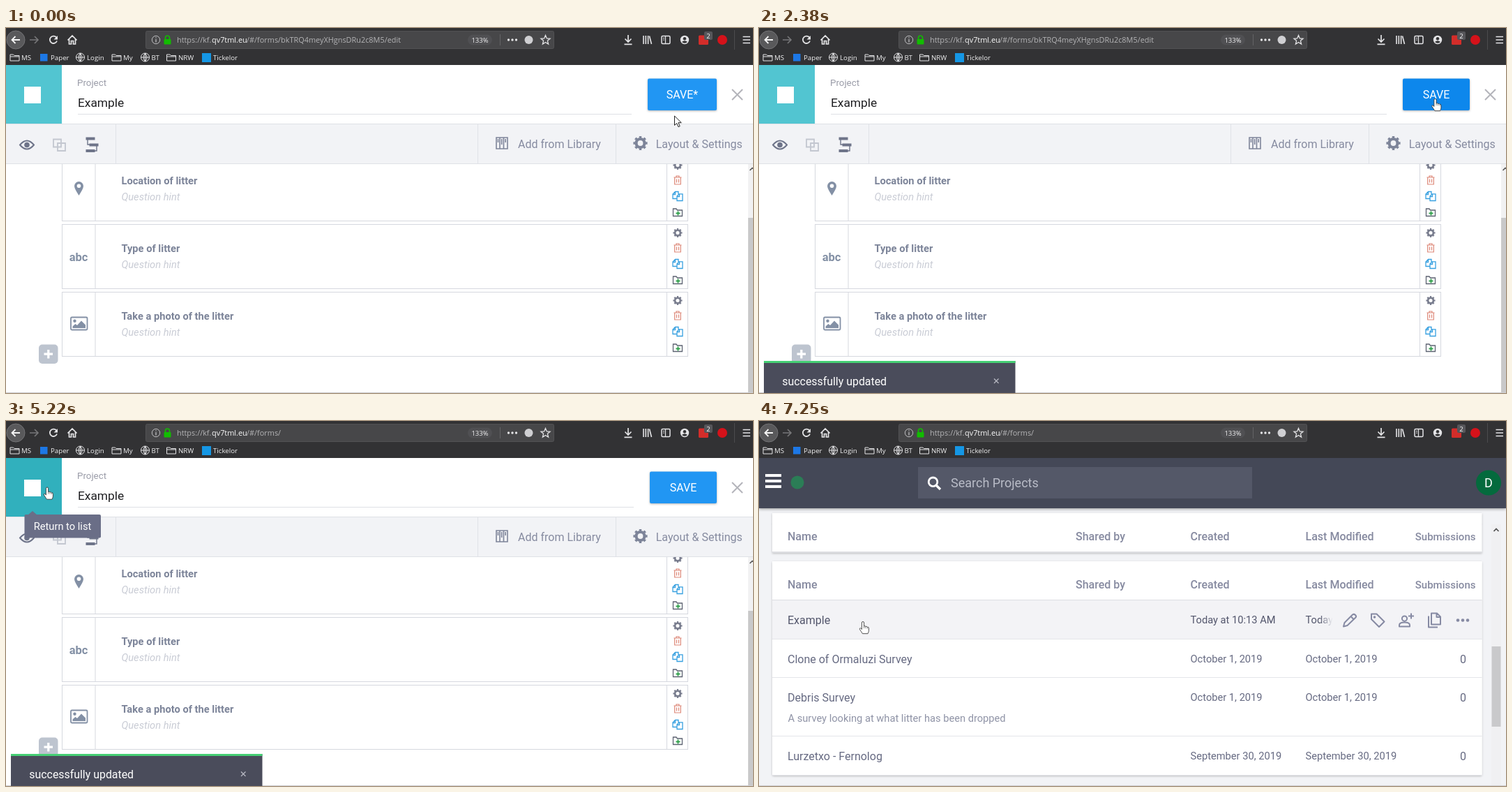
Animation, 1071 px wide and 523 px high, one loop 8000 ms. Source, as an HTML page:

```html
<!DOCTYPE html>
<html lang="en">
<head>
<meta charset="utf-8">
<title>Saving a form</title>
<style>
  html, body { margin: 0; width: 100%; height: 100%; overflow: hidden; background: #fff; }
  svg { display: block; width: 1071px; height: 523px; font-family: Roboto, sans-serif; }
  .ui { font-family: "Open Sans", sans-serif; }
  .row text { fill: #666a82; }
  .row .sub { fill: #8f93a6; }
  .row.on text { fill: #53566c; }
  .row.on .sub { fill: #83879b; }
  .row.on .bg { fill: #f3f3f6; }
  .card { filter: drop-shadow(0 1px 1.5px rgba(0, 0, 0, .22)); }
</style>
</head>
<body>
<svg id="stage" viewBox="0 0 1071 523"></svg>
<script>
const LOOP = 8000;
const stage = document.getElementById('stage');

// Markup helpers
const rect = (x, y, w, h, fill, more = '') =>
  `<rect x="${x}" y="${y}" width="${w}" height="${h}" fill="${fill}" ${more}/>`;
const text = (x, y, str, size, fill, more = '') =>
  `<text x="${x}" y="${y}" font-size="${size}" fill="${fill}" ${more}>${str}</text>`;
const line = (d, color, w = 1, more = '') =>
  `<path d="${d}" fill="none" stroke="${color}" stroke-width="${w}" ${more}/>`;
const shape = (d, fill, more = '') => `<path d="${d}" fill="${fill}" ${more}/>`;
const disc = (x, y, r, fill, more = '') =>
  `<circle cx="${x}" cy="${y}" r="${r}" fill="${fill}" ${more}/>`;
const ring = (x, y, r, color, w = 1, more = '') =>
  disc(x, y, r, 'none', `stroke="${color}" stroke-width="${w}" ${more}`);
const at = (x, y, body, more = '') => `<g transform="translate(${x} ${y})" ${more}>${body}</g>`;
const MID = ' text-anchor="middle"', END = ' text-anchor="end"';

const gear = (x, y, r, color) =>
  ring(x, y, r * .6, color, r * .42) +
  ring(x, y, r * .86, color, r * .3, 'pathLength="16" stroke-dasharray="1 1" stroke-dashoffset=".5"');

// Browser toolbar
function browserBar() {
  const c = '#e4e4e6', ui = 'class="ui"';
  const folder = x => at(x, 42, line('M-6.5-4H-2L-.5-2.5H6.5V5H-6.5ZM-6.5-1H6.5', c));
  const globe = x => at(x, 42, ring(0, 0, 6, c) + line('M-6 0H6M0-6V6M0-6Q-5 0 0 6Q5 0 0-6', c));
  const label = (x, s) => text(x, 46, s, 9.7, '#f2f2f3', ui);
  return rect(0, 0, 1071, 53, '#323234') +
    disc(14, 17, 13, '#59595b', 'stroke="#737376"') +
    line('M20 17H8.5M13.5 12L8.5 17L13.5 22', '#f5f5f5', 1.8) +
    line('M34 17H46M41 12L46 17L41 22', '#777779', 1.6) +
    line('M72.5 14A5.2 5.2 0 1 0 73 18.5', c, 1.8) + shape('M74 11V16.5H68.5Z', c) +
    line('M88.5 17.5L95 11L101.5 17.5M90.5 16V23H93.5V18.5H96.5V23H99.5V16', c, 1.7) +
    rect(200.5, 4.5, 585, 25, '#474749', 'rx="2" stroke="#525254"') +
    ring(215, 17, 5.7, '#bdbdbf') + line('M215 16V20.5M215 13.2V14.6', '#bdbdbf', 1.3) +
    rect(226.5, 16, 10, 7.5, '#12bc00', 'rx="1"') + line('M228.5 16V14A3 3 0 0 1 234.5 14V16', '#12bc00', 1.7) +
    text(245, 21, 'https://kf.', 10.9, '#b4b4b6', ui) +
    text(295, 21, 'qv7tml.eu', 10.9, '#fafafa', ui) +
    '<text id="path" x="345" y="21" font-size="10.9" fill="#b4b4b6" class="ui"></text>' +
    rect(662, 9.5, 35, 15, '#505053', 'rx="7.5"') + text(679.5, 20.8, '133%', 9.5, '#f2f2f3', ui + MID) +
    line('M708.5 9V25', '#636365') +
    [720.5, 726, 731.5].map(x => disc(x, 17, 1.7, c)).join('') +
    disc(749.5, 17, 6, '#cfcfd2') +
    line('M773.5 10.5L775.4 15L780 15.3L776.4 18.3L777.6 23L773.5 20.4L769.4 23L770.6 18.3L767 15.3L771.6 15Z', c, 1.3) +
    line('M892 10V19M887.5 15.5L892 20L896.5 15.5M886.5 23.3H897.5', c, 1.7) +
    line('M914 11V23M917.3 11V23M920.6 11V23M922.5 11.5L925.5 23', c, 1.6) +
    rect(940, 11.5, 12, 11, 'none', `stroke="${c}" stroke-width="1.5" rx="1.5"`) +
    line('M945.5 11.5V22.5M942 14.5H944M942 17H944', c, 1.2) +
    disc(973, 17, 6.2, c) + disc(973, 15.3, 2.2, '#323234') + shape('M969 20Q973 16.5 977 20Q973 23.5 969 20', '#323234') +
    rect(993, 10.5, 14, 13.5, '#d32d2a', 'rx="1.5"') +
    rect(1001, 5, 12, 12, '#56565a', 'rx="2"') + text(1007, 14.5, '2', 9.5, '#fff', ui + MID) +
    disc(1027, 17, 7, '#d5121a') +
    line('M1044.5 3V31', '#4b4b4e') +
    line('M1056.5 12.5H1067M1056.5 17H1067M1056.5 21.5H1067', c, 1.7) +
    folder(12.5) + label(22, 'MS') +
    rect(49, 37, 10.5, 10.5, '#1d78e6') + label(64, 'Paper') +
    globe(106.5) + label(116, 'Login') +
    folder(158.5) + label(168, 'My') +
    globe(199.5) + label(208.5, 'BT') +
    folder(237) + label(247, 'NRW') +
    rect(281, 36, 13, 13, '#1597e5') + label(297, 'Tickelor');
}

// Form editor
function question(i, title, icon) {
  return at(0, 184 + 97 * i,
    rect(80.5, .5, 897, 92, '#fff', 'stroke="#d6d8df"') +
    line('M128 .5V92M947.5 .5V92', '#d6d8df') + icon +
    text(165.5, 40, title, 14.67, '#7c8499', 'font-weight="700"') +
    text(165.5, 63, 'Question hint', 14.67, '#c9ccd5', 'font-style="italic"') +
    gear(963, 12.5, 6.5, '#797d8e') +
    at(963, 34, line('M-5.5-4H5.5M-2-4V-6H2V-4M-4.3-4V6H4.3V-4M-1.5-1.5V3.5M1.5-1.5V3.5', '#dd8878', 1.2)) +
    at(963, 57, line('M-1 3.5H-7V-3L-3.5-6.5H1V-3M-7-2.5H-3.5V-6M-1 6.5V0L2-3.2H7V6.5ZM-1 .5H2.5V-3', '#37a0e0', 1.3)) +
    at(963, 80, line('M-6.5-5H-2L-.5-3H6.5V5.5H-6.5Z', '#5d6372', 1.3) +
      line('M.5-1.5V4.5M-2.5 1.5H3.5', '#31a04c', 1.8)));
}

function editorPage() {
  const g = '#7d8499';
  const pin = shape('M104.5 56Q98 46 98 42.5A6.5 6.5 0 0 1 111 42.5Q111 46 104.5 56ZM104.5 39.5A2.8 2.8 0 1 0 104.5 45.1A2.8 2.8 0 1 0 104.5 39.5Z', '#8390a5', 'fill-rule="evenodd"');
  const abc = text(104, 53, 'abc', 16.5, '#8390a5', 'font-weight="700"' + MID);
  const photo = rect(93, 36.5, 23.5, 18, 'none', 'stroke="#8390a5" stroke-width="1.8" rx="1.5"') +
    disc(98.5, 41.7, 2.2, '#8390a5') + shape('M95.5 52V49.5L99.5 46L102 48L108 41.5L114 47.5V52Z', '#8390a5');
  return rect(0, 53, 1071, 470, '#fff') +
    question(0, 'Location of litter', pin) +
    question(1, 'Type of litter', abc) +
    question(2, 'Take a photo of the litter', photo) +
    rect(47, 453.5, 27.5, 27.5, '#bdc4cf', 'rx="5"') + line('M60.8 461V473.5M54.5 467.2H67', '#fff', 3.2) +
    rect(1064, 194, 7, 329, '#f1f1f2') + rect(1064, 272, 7, 251, '#c9c9ca') +
    line('M1066.5 204L1070 200.5L1073.5 204', '#505050', 1.5) +
    rect(0, 137, 1071, 57, '#f2f3f6') + line('M0 137.5H1071M0 194.5H1071', '#dfe1e6') +
    line('M157.5 138V194M676.5 138V194M874.5 138V194', '#e0e2e7') +
    line('M20 167.5Q30 155.5 40 167.5Q30 179.5 20 167.5Z', '#6e7489', 2) + disc(30, 167.5, 3.8, '#6e7489') +
    line('M68 159.5H79V170.5H68ZM74 165H85V176H74Z', '#c3c7d0', 1.8) +
    line('M114.5 158.5H127.5M119.5 167.5H132.5M114.5 176H127.5', '#6e7489', 4.2) +
    line('M117 158V167H122M130 167V176H126', '#6e7489', 1.4) +
    line('M703 157H708V173H703ZM708 157H713.5V173H708ZM713.5 157H719V173H713.5ZM705.5 159V164M710.7 159V167M716.2 159V164', g, 1.6) +
    text(734, 172, 'Add from Library', 16, '#868ba0') +
    gear(909.5, 165, 10, g) + text(931.7, 172, 'Layout &amp; Settings', 16, '#868ba0') +
    '<rect id="home" y="53" width="80" height="84"/>' + rect(26, 84, 24, 24, '#fff') +
    text(102, 83, 'Project', 13.33, '#9a9ca8') +
    text(103, 113, 'Example', 17.33, '#1d1d20') +
    '<path id="underline" stroke="#dfe1e5"/>' +
    '<rect id="save" y="72.5" height="45.5" rx="2" style="filter:drop-shadow(0 1px 1.5px rgba(0,0,0,.3))"/>' +
    `<text id="saveText" y="101" font-size="16" fill="#fff" ${MID}></text>` +
    line('M1041 88L1056 103M1056 88L1041 103', '#b4b5bb', 2) +
    `<g id="tip">${shape('M31 135L38 129L45 135Z', '#6a6e87')}${rect(26.5, 134, 109.5, 33.5, '#6a6e87', 'rx="2"')}
      ${text(81, 156, 'Return to list', 14.67, '#fff', MID)}</g>`;
}

// Project list
const headings = y => {
  const h = (x, s, size = 16, more = '') => text(x, y + 39, s, size, '#868aa0', 'font-weight="500"' + more);
  return rect(19, y, 1017.5, 56, '#fff') + rect(19, y + 55, 1017.5, 2, '#dddee2') +
    h(41, 'Name') + h(454, 'Shared by') + h(618.5, 'Created') + h(783.5, 'Last Modified') + h(1027.5, 'Submissions', 15, END);
};

const OCT = 'October 1, 2019';
const deployed = [
  ['Ormaluzi Survey', '', OCT, 'Yesterday at 2:07 PM', 35, 'Ormaluzi Surveying'],
  ['Lurzetxo - Fernolog', 'orzek', 'September 26, 2019', 'October 2, 2019', 21],
  ['Feedback Survey', '', OCT, OCT, 4],
  ['Debris Project', 'tmarrn4', OCT, OCT, 47, 'A project that collects data about litter in our environment'],
  ['Feedback Form', '', OCT, OCT, 0, 'Feedback for the app from the Spain trip']
];
const drafts = [
  ['Example', '', 'Today at 10:13 AM', 'Today at 10:13 AM', 0],
  ['Clone of Ormaluzi Survey', '', OCT, OCT, 0],
  ['Debris Survey', '', OCT, OCT, 0, 'A survey looking at what litter has been dropped'],
  ['Lurzetxo - Fernolog', '', 'September 30, 2019', 'September 30, 2019', 0]
];

function actions(h) {
  const c = '#868aa3', ic = (x, d) => at(x, 28.5, line(d, c, 2, 'stroke-linejoin="round"'));
  return `<g class="acts">${rect(804, 1, 232, h - 2, 'url(#fade)')}` +
    ic(847, 'M-9 9L-7.5 3.5L4-8Q6-9.5 8-7.5T8.5-4L-3.5 7.5ZM1.5-5.5L6-1') +
    ic(887, 'M-9-9H-1.5L9.5 2L2 9.5L-9-1.5Z') + disc(882.5, 24, 1.8, c) +
    ic(928, 'M-10 9V7Q-10 3-2.5 3T5 7V9ZM-2.5-6A3.6 3.6 0 1 0-2.5 1.2A3.6 3.6 0 1 0-2.5-6M7-10V-2M3-6H11') +
    ic(968, 'M-8-6V10H5M-4-10H4L9-5V6H-4ZM3.5-10V-4.5H9') +
    [1002, 1009, 1016].map(x => disc(x, 28.5, 2.3, c)).join('') + '</g>';
}

// Rows have fractional heights but snap to whole pixels
function card(start, rows) {
  const top = Math.round(start);
  let y = start + 56.8, body = '';
  for (const [name, by, made, changed, count, sub] of rows) {
    const next = y + (sub ? 84.5 : 55.3);
    const h = Math.round(next) - Math.round(y);
    const main = (x, s, more = '') => text(x, 34, s, 16, '', more);
    const date = (x, s) => text(x, 33, s, 14.67, '');
    body += at(0, Math.round(y), rect(19, 0, 1017.5, h, '#fff', 'class="bg"') + rect(19, h - 1, 1017.5, 1, '#e4e5e9') +
      main(41, name) + main(454, by) + date(618.5, made) + date(783.5, changed) + main(1014, count, END) +
      (sub ? text(41.5, 63, sub, 14.67, '', 'class="sub"') : '') + actions(h), 'class="row"');
    y = next;
  }
  return rect(19, top, 1017.5, Math.round(y) - top, '#fff', 'class="card" rx="2"') + headings(top) + body;
}

function listPage() {
  return rect(0, 53, 1071, 470, '#f2f3f6') +
    `<g clip-path="url(#view)"><g id="list">` +
    text(18.5, 165, 'Deployed', 16, '#767a90', 'font-weight="500"') +
    card(181.3, deployed) +
    text(18.5, 641, 'Draft', 16, '#767a90', 'font-weight="500"') +
    card(656.6, drafts) + '</g></g>' +
    `<g id="sticky" class="card">${headings(132)}</g>` +
    rect(1050, 148, 14, 375, '#f0f0f2') + line('M1053.5 158L1057 154.5L1060.5 158', '#505050', 1.7) +
    '<rect id="thumb" x="1050.5" y="162" width="13" height="115" fill="#c9c9cb"/>' +
    rect(0, 53, 1071, 72, '#444857', 'style="filter:drop-shadow(0 1px 2px rgba(0,0,0,.4))"') +
    line('M9 78H32M9 86H32M9 94H32', '#fff', 4) +
    disc(55, 88, 9.5, '#2b7d56') +
    rect(228, 66, 479, 45, '#545868') +
    ring(249.5, 87.3, 6.3, '#fff', 2.8) + line('M254 92L260 98', '#fff', 3.4) +
    text(275, 95, 'Search Projects', 18, '#b9bcc7') +
    disc(1046, 88.5, 18, '#046a3d') + text(1046, 95, 'D', 18, '#fff', MID);
}

const toast = rect(7, 477, 360.5, 46, '#4a4c5b') + rect(7, 477, 360.5, 3, '#45cf74') +
  text(33.3, 512, 'successfully updated', 15.9, '#fff') +
  line('M337 502.5L343.5 509M343.5 502.5L337 509', '#b9bac4', 1.2);

const pointers = {
  arrow: shape('M0 0V13.4L3.2 10.5L5.5 15.7L7.7 14.7L5.4 9.7H9.8Z', '#fff', 'stroke="#222"'),
  beam: line('M-3.5-7H-1Q0-7 0-6V6Q0 7-1 7H-3.5M3.5-7H1Q0-7 0-6V6Q0 7 1 7H3.5', '#111', 1.5),
  hand: shape('M-1.6 1.5Q-1.6 0 0 0T1.6 1.5V6.5Q3 5.6 4 7Q5.6 6.2 6.4 7.8Q8.4 7.2 8.4 9.5V13Q8.2 15 7 17.2H-.6Q-2.5 14-4.6 11Q-5.2 9.4-3.6 9.2L-1.6 11Z', '#fff', 'stroke="#333" stroke-width=".85"') +
    line('M1.6 6.5V9.5M4 7.2V9.7M6.4 8V10', '#333', .6)
};

stage.innerHTML =
  `<defs><clipPath id="view"><rect y="147" width="1044" height="376"/></clipPath>
   <linearGradient id="fade"><stop stop-color="#f3f3f6" stop-opacity="0"/><stop offset=".08" stop-color="#f3f3f6"/></linearGradient></defs>` +
  `<g id="editor">${editorPage()}</g><g id="projects">${listPage()}</g>` +
  line('M0 522.5H1071', '#cfcfd3') + `<g id="toast">${toast}</g>` + browserBar() +
  '<circle id="click" r="10" fill="#ff0" fill-opacity=".47"/>' +
  Object.keys(pointers).map(k => `<g id="${k}">${pointers[k]}</g>`).join('');

// Step tables: start time, then values
const steps = {
  pointer: [[0, 'arrow', 958.5, 126], [200, 'hand', 969.5, 101.5], [3390, 'beam', 333, 121], [3590, 'beam', 329, 121],
    [3800, 'beam', 148, 103.5], [3990, 'beam', 131, 101], [4190, 'hand', 66, 86.5], [4410, 'hand', 59, 95],
    [6440, 'hand', 192, 374.5], [6870, 'hand', 152, 310], [7050, 'hand', 151, 292], [7250, 'hand', 149, 287.5]],
  click: [[0, 0], [1360, 1], [1580, 0], [5000, 1], [5220, 0]],
  save: [[0, 920, 'SAVE*'], [1760, 918, 'SAVE…'], [1980, 923, 'SAVE']],
  toast: [[0, 0, 0], [1980, -82, .77], [2180, 30, 1], [2380, 0, 1], [6870, 0, 0]],
  tip: [[0, 0], [4190, .5], [4410, .9], [4630, 1]],
  scroll: [[0, 0], [6650, 119], [6870, 456]],
  row: [[0, -1], [6440, 1], [6650, 3], [6870, 5]],
  acts: [[0, 0], [6440, 1], [6650, 0], [7050, .5], [7250, 1]]
};
const now = (name, t) => steps[name].findLast(s => s[0] <= t).slice(1);

const el = id => document.getElementById(id);
const set = (id, attrs) => { for (const k in attrs) el(id).setAttribute(k, attrs[k]); };
const show = (id, on) => set(id, { visibility: on ? 'visible' : 'hidden' });
const move = (id, x, y) => set(id, { transform: `translate(${x} ${y})` });
const rows = [...document.querySelectorAll('.row')];

function draw(t) {
  const [kind, px, py] = now('pointer', t);
  for (const k in pointers) show(k, k === kind);
  move(kind, px, py);
  move('click', px, py);
  show('click', now('click', t)[0]);

  const list = t >= 5630;
  set('editor', { display: list ? 'none' : 'inline' });
  set('projects', { display: list ? 'inline' : 'none' });
  el('path').textContent = t < 5220 ? '/#/forms/bkTRQ4meyXHgnsDRu2c8M5/edit' : '/#/forms/';

  const [left, label] = now('save', t);
  set('save', { x: left, width: 1019 - left, fill: t >= 200 && t < 3390 ? '#0d87ec' : '#2196f3' });
  set('saveText', { x: (left + 1019) / 2 });
  el('saveText').textContent = label;
  set('underline', { d: `M103 123.5H${left - 23}` });
  set('home', { fill: t >= 4410 ? '#31b0bd' : '#52c5d1' });
  set('tip', { opacity: now('tip', t)[0] });

  const [slide, alpha] = now('toast', t);
  move('toast', slide, 0);
  set('toast', { opacity: alpha });

  const [scroll] = now('scroll', t), [active] = now('row', t), [acts] = now('acts', t);
  move('list', 0, -scroll);
  move('thumb', 0, scroll * .353);
  set('sticky', { display: scroll > 400 ? 'inline' : 'none' });
  rows.forEach((r, i) => {
    r.classList.toggle('on', i === active);
    r.querySelector('.acts').setAttribute('opacity', i === active ? acts : 0);
  });
}

const start = performance.now();
function tick() {
  draw((performance.now() - start) % LOOP);
  requestAnimationFrame(tick);
}
tick();
</script>
</body>
</html>
```
